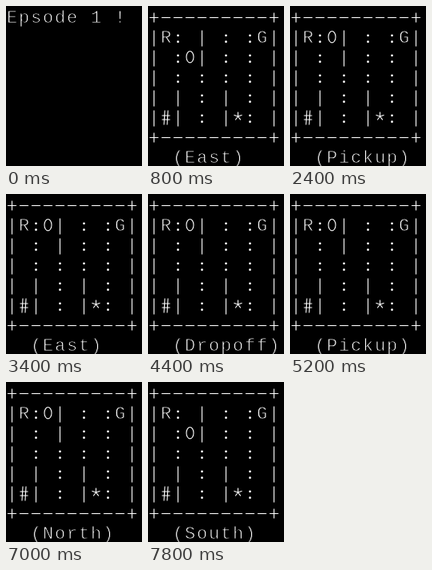
An HTML page that plays this animation: 170x200 px, repeating every 8000 ms.

```html
<!DOCTYPE html>
<html lang="en">
<head>
<meta charset="utf-8">
<title>Taxi grid</title>
<style>
  html, body { margin: 0; width: 100%; height: 100%; overflow: hidden; background: #000; }
  svg { display: block; width: 170px; height: 200px; }
  text {
    font: 22px "Liberation Mono", "Courier New", monospace;
    letter-spacing: 1.8px;
    fill: #fff; stroke: #000; stroke-width: .8px;
    white-space: pre;
  }
  path { fill: none; stroke: #fff; stroke-width: 1.1px; stroke-linecap: square; }
  path.dots { stroke-width: 2.8px; stroke-linecap: round; }
</style>
</head>
<body>
<svg viewBox="0 0 170 200">
  <text id="title" x="1" y="21">Epsode 1 !</text>
  <g id="board"></g>
  <g id="taxi">
    <rect y="-18" width="15" height="23"/>
    <path d="M3 -7.3a4.5 7.2 0 0 1 9 0a4.5 7.2 0 0 1 -9 0"/>
  </g>
  <text id="caption" x="31" y="196"></text>
</svg>
<script>
const CELL = 15, LINE = 25, BASE = 21, LOOP = 8000;
const MAP = [
  '+---------+',
  '|R: | : :G|',
  '| : | : : |',
  '| : : : : |',
  '| | : | : |',
  '|#| : |*: |',
  '+---------+'
];

// Line symbols, drawn from the left end of the baseline
const SYMBOLS = {
  '-': 'M2.5 -6.5h10',
  '+': 'M2.5 -6.5h10M7.5 -12v11',
  '|': 'M7.5 -15v19',
  ':': 'M7.5 -9.2v.01M7.5 -1.3v.01',
  '#': 'M6 -15l-1 17M10 -15l-1 17M3 -9h9M3 -4h9',
  '*': 'M7.5 -8v-5M7.5 -8l-4.5 -1.5M7.5 -8l4.5 -1.5M7.5 -8l-3 4M7.5 -8l3 4'
};

// [start ms, action, row, column]
const STEPS = [
  [200, '', 2, 3], [400, 'Pickup', 2, 3], [600, 'Dropoff', 2, 3], [800, 'East', 2, 3],
  [1200, 'West', 2, 1], [1400, 'North', 1, 1], [1600, 'East', 1, 3], [1800, 'South', 2, 3],
  [2000, 'North', 1, 3], [2200, 'East', 1, 3], [2400, 'Pickup', 1, 3], [2600, 'South', 2, 3],
  [2800, 'North', 1, 3], [3200, 'Pickup', 1, 3], [3400, 'East', 1, 3], [3800, 'South', 2, 3],
  [4000, 'North', 1, 3], [4200, 'East', 1, 3], [4400, 'Dropoff', 1, 3], [4600, 'South', 2, 3],
  [4800, 'North', 1, 3], [5000, 'Dropoff', 1, 3], [5200, 'Pickup', 1, 3], [5400, 'South', 2, 3],
  [5600, 'East', 2, 3], [5800, 'Dropoff', 2, 3], [6000, 'North', 1, 3], [6200, 'Dropoff', 1, 3],
  [6400, 'Pickup', 1, 3], [6600, 'South', 2, 3], [6800, 'Dropoff', 2, 3], [7000, 'North', 1, 3],
  [7200, 'Pickup', 1, 3], [7400, 'Dropoff', 1, 3], [7600, 'East', 1, 3], [7800, 'South', 2, 3]
];

const [title, board, taxi, caption] =
  ['title', 'board', 'taxi', 'caption'].map(id => document.getElementById(id));

function place(el, row, col) {
  el.setAttribute('transform', `translate(${col * CELL} ${BASE + row * LINE})`);
}

function addCell(char, row, col) {
  if (char === ' ') return;
  const shape = SYMBOLS[char];
  const el = document.createElementNS('http://www.w3.org/2000/svg', shape ? 'path' : 'text');
  if (shape) {
    el.setAttribute('d', shape);
    if (char === ':') el.setAttribute('class', 'dots');
  } else {
    el.setAttribute('x', 1);
    el.textContent = char;
  }
  place(el, row, col);
  board.append(el);
}

MAP.forEach((line, row) => [...line].forEach((char, col) => addCell(char, row, col)));

function render(step) {
  title.style.display = step ? 'none' : '';
  for (const el of [board, taxi, caption]) el.style.display = step ? '' : 'none';
  if (!step) return;
  const [, action, row, col] = step;
  caption.textContent = action && `(${action})`;
  place(taxi, row, col);
}

const start = performance.now();
let shown = null;
function tick() {
  const t = (performance.now() - start) % LOOP;
  const step = STEPS.findLast(s => s[0] <= t);
  if (step !== shown) render(shown = step);
  requestAnimationFrame(tick);
}
tick();
</script>
</body>
</html>
```
